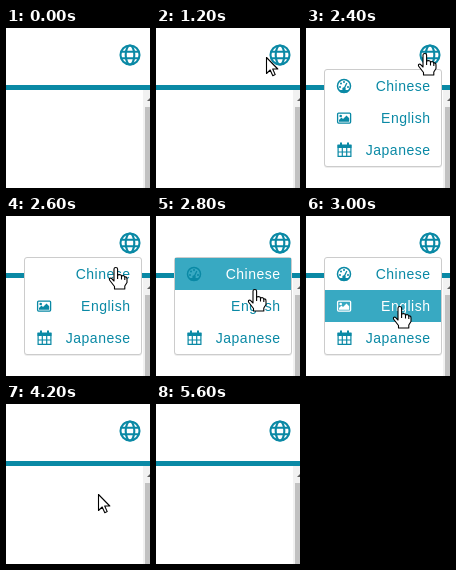
Animation, 144 px wide and 160 px high, one loop 7.1 s. Source, as an HTML page:

```html
<!DOCTYPE html>
<html lang="en">
<head>
<meta charset="utf-8">
<title>Language menu</title>
<style>
  html, body { margin: 0; width: 100%; height: 100%; overflow: hidden; background: #fff; }
  svg { display: block; width: 100vw; height: 100vh; }
  text { font: 14px "Liberation Sans", Arial, sans-serif; letter-spacing: .5px; text-anchor: end; }
  .line { fill: none; stroke: currentColor; }
  .row .icon { fill: currentColor; }
  .cursor path { fill: #fff; stroke: #000; stroke-width: 1.1; stroke-linejoin: round; }
</style>
</head>
<body>
<svg viewBox="0 0 144 160">
  <rect width="144" height="160" fill="#fff"/>
  <rect y="57" width="144" height="5" fill="#0a89a5"/>
  <g id="scrollbar">
    <rect x="137" y="62" width="7" height="98" fill="#f1f1f1"/>
    <rect x="139" y="79" width="5" height="81" fill="#c1c1c1"/>
    <path d="M141 73 L144.500 69.500 V73z" fill="#606060"/>
  </g>
  <g id="globe" class="line" transform="translate(124 27)" color="#0a89a5" stroke-width="2.100">
    <circle r="9.500"/>
    <ellipse rx="4.300" ry="9.500"/>
    <path d="M-9 -3.200H9M-9 3.200H9"/>
  </g>

  <g id="menu">
    <rect x="18" y="42" width="118" height="98" rx="3" fill="#000" opacity=".07"/>
    <rect x="18.500" y="41.500" width="117" height="97" rx="2.500" fill="#fff" stroke="#ccc"/>
    <g class="row" transform="translate(0 42)">
      <rect class="back" x="19" width="116" height="32" fill="#38a9c2"/>
      <g class="icon" transform="translate(38 16)">
        <circle class="line" r="6.500" stroke-width="1.500"/>
        <path class="line" d="M0 3 L2.800 -3" stroke-width="1.300"/>
        <circle cy="3" r="1.800"/>
        <circle cx="-4" cy="1" r="1"/><circle cx="-3" cy="-2.500" r="1"/>
        <circle cy="-4" r="1"/><circle cx="4" cy="1" r="1"/>
        <path d="M-5 4H5L3.500 6.500H-3.500z"/>
      </g>
      <text x="124.500" y="21">Chinese</text>
    </g>
    <g class="row" transform="translate(0 74)">
      <rect class="back" x="19" width="116" height="32" fill="#38a9c2"/>
      <g class="icon" transform="translate(38 16)">
        <rect class="line" x="-6.400" y="-4.900" width="13" height="10" rx="1" stroke-width="1.300"/>
        <circle cx="-3.300" cy="-2" r="1.300"/>
        <path d="M-5 3.700V2L-2.500 -.5L-1 1L2.500 -2.500L5.200 .3V3.700z"/>
      </g>
      <text x="124.500" y="21">English</text>
    </g>
    <g class="row" transform="translate(0 106)">
      <rect class="back" x="19" width="116" height="32" fill="#38a9c2"/>
      <g class="icon" transform="translate(38.500 16)">
        <path d="M-7 -5.500H7V-2H-7z"/>
        <path class="line" d="M-6.400 -5V6.400H6.400V-5M-6 2H6M-2.200 -2V6M2.200 -2V6" stroke-width="1.200"/>
        <path class="line" d="M-3.500 -7.500V-3.500M3.500 -7.500V-3.500" stroke-width="2"/>
      </g>
      <text x="124.500" y="21">Japanese</text>
    </g>
  </g>

  <g id="arrow" class="cursor">
    <path d="M.5 .5V16.500L4.200 13L6.800 18.700L9.200 17.600L6.700 12H11.800z"/>
  </g>
  <g id="hand" class="cursor">
    <path d="M-2 14V2Q-2 .5 -.2 .5Q1.600 .5 1.600 2V8Q5 7 5.500 9Q8 8 8.800 10Q11 9.500 11 12V15.500L8.800 19V22H-1.500V19.500L-6.500 13Q-7 10.800 -4.800 11.200z"/>
    <path d="M1.600 8V12M5.500 9V12.500M8.800 10V13"/>
  </g>
</svg>
<script>
const LOOP = 7100, STEP = 100;
const TEAL = [10, 137, 165];
const $ = id => document.getElementById(id);
const rows = [...document.querySelectorAll('.row')];

// Pointer path: [time, x, y]
const path = [
  [800, 58, 112], [1000, 84, 66], [1200, 110, 29], [1300, 116, 23], [1400, 118, 20],
  [2300, 118, 20], [2400, 119, 25], [2600, 110, 51], [2800, 99, 73],
  [2900, 95, 103], [3000, 94, 90]
];
// Time at which the pointer enters and leaves each row
const hovers = [[2600, 2800], [2800, Infinity], [Infinity, Infinity]];

const ramp = (t, from, to) => Math.min(1, Math.max(0, (t - from) / (to - from)));
const since = (t, start) => start === Infinity ? 0 : ramp(t, start, start + 200);
const tint = k => `rgb(${TEAL.map(c => Math.round(c + (255 - c) * k))})`;

function pointerAt(t) {
  const next = path.findIndex(p => p[0] > t);
  if (next < 0) return path[path.length - 1].slice(1);
  if (next === 0) return path[0].slice(1);
  const [t0, x0, y0] = path[next - 1], [t1, x1, y1] = path[next];
  const k = ramp(t, t0, t1);
  return [x0 + (x1 - x0) * k, y0 + (y1 - y0) * k];
}

function show(element, opacity) {
  element.style.opacity = opacity;
}

function draw(t) {
  show($('menu'), ramp(t, 1700, 1900) - ramp(t, 3900, 4200));
  rows.forEach((row, i) => {
    const [enter, leave] = hovers[i];
    const lit = since(t, enter) - since(t, leave);
    show(row.querySelector('.back'), lit);
    row.querySelector('text').style.fill = tint(lit);
    row.querySelector('.icon').style.color = tint(t >= enter && t < leave ? 1 : 0);
  });

  const [x, y] = pointerAt(t);
  const pointing = t >= 1300 && t < 4200;
  const visible = ramp(t, 700, 900) - ramp(t, 5300, 5600);
  show($('hand'), pointing ? 1 : 0);
  show($('arrow'), pointing ? 0 : visible);
  $('hand').setAttribute('transform', `translate(${x} ${y})`);
  $('arrow').setAttribute('transform', `translate(${t > 4000 ? x - 2 : x} ${y})`);
}

const start = performance.now();
function tick() {
  const t = (performance.now() - start) % LOOP;
  draw(Math.floor(t / STEP) * STEP);
  requestAnimationFrame(tick);
}
tick();
</script>
</body>
</html>
```
